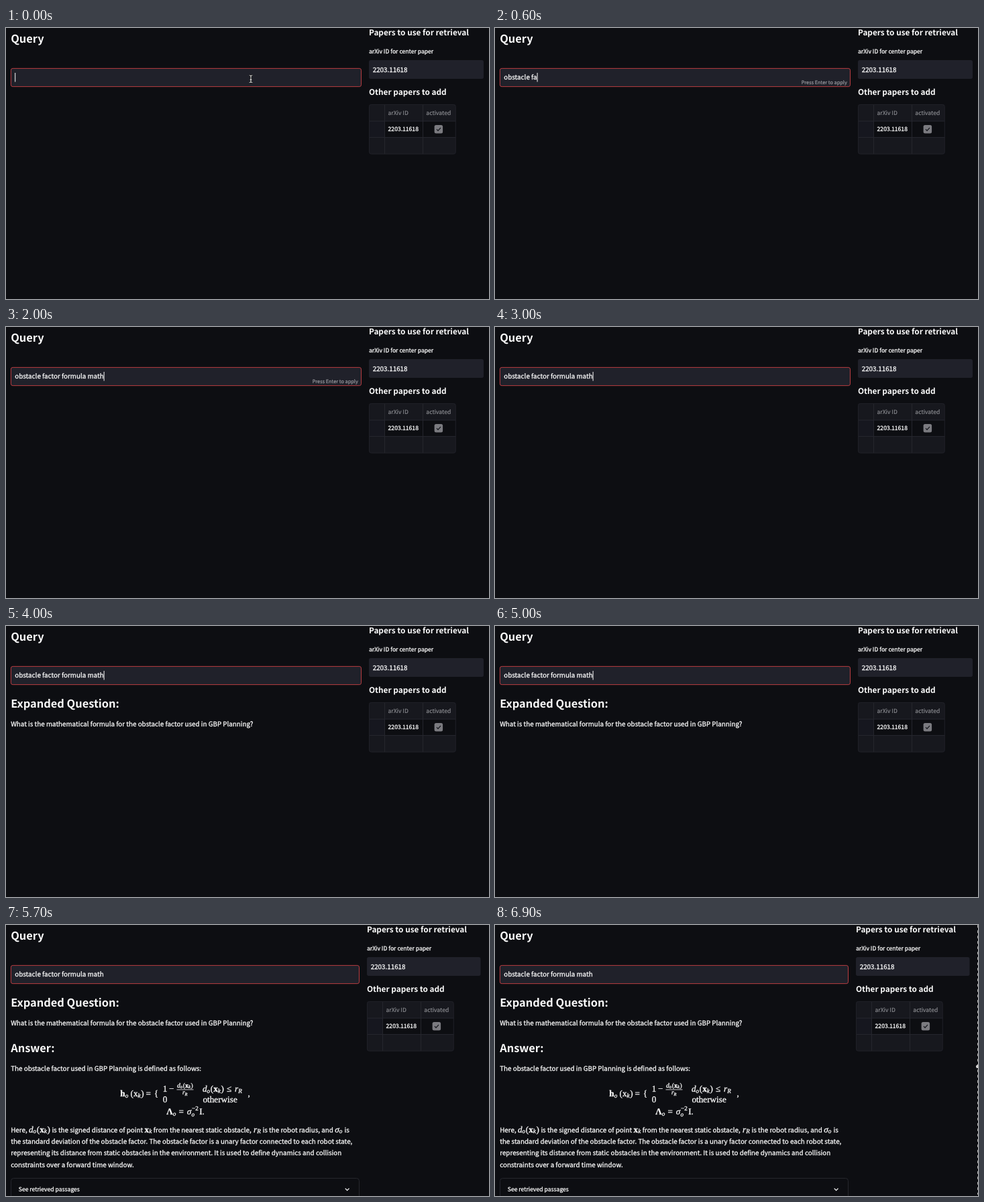
An HTML page that plays this animation: 720 px wide and 405 px high, repeating every 7 s.

```html
<!DOCTYPE html>
<html lang="en">
<head>
<meta charset="utf-8">
<title>Paper query</title>
<style>
  html, body { margin: 0; width: 100%; height: 100%; overflow: hidden; background: #0d0e12; }
  svg { display: block; width: 720px; height: 405px; }
  text {
    font-family: "Noto Sans CJK JP", "Noto Sans CJK SC", "Noto Sans CJK KR", "Noto Sans", sans-serif;
    font-size: 9.83px; fill: #fafafa; stroke: #fafafa; stroke-width: 0.3px;
    text-rendering: geometricPrecision; white-space: pre;
  }
  .title { font-size: 16.4px; font-weight: 700; stroke: none; }
  .subtitle { font-size: 11.8px; font-weight: 700; stroke: none; }
  .small { font-size: 8.6px; }
  .hint { font-size: 7.37px; fill: #a0a1a6; stroke: #a0a1a6; stroke-width: 0.15px; }
  .grey { font-size: 8.6px; fill: #8e8f94; stroke: #8e8f94; stroke-width: 0.15px; }
  .math { font-family: "Liberation Serif", serif; }
</style>
</head>
<body>
<svg id="stage" viewBox="0 0 720 405"></svg>
<script>
const LOOP = 7000, STEP = 100;
const QUERY = "obstacle factor formula math";
const KEY_TIME = 54, ENTER = 2300, QUESTION = 3600, ANSWER = 5700, SELECTION = 6800;

const stage = document.getElementById("stage");

function add(parent, tag, attrs = {}, content = "") {
  const node = document.createElementNS("http://www.w3.org/2000/svg", tag);
  for (const key in attrs) node.setAttribute(key, attrs[key]);
  node.textContent = content;
  return parent.appendChild(node);
}
const group = (parent = stage) => add(parent, "g");
const label = (parent, x, y, content, style = "") =>
  add(parent, "text", { x, y, class: style }, content);
const box = (parent, x, y, width, height, fill, rx = 0, stroke = "none") =>
  add(parent, "rect", { x, y, width, height, fill, rx, stroke });
const line = (parent, d, stroke, width = 1) =>
  add(parent, "path", { d, stroke, "stroke-width": width, fill: "none" });

// Tokens: /italic  *bold  _subscript  plain
function math(parent, x, y, tokens, size = 13.2) {
  const node = add(parent, "text", { x, y, class: "math", style: `font-size:${size}px` });
  let lowered = false;
  for (const token of tokens.split(" ")) {
    const sub = token[0] === "_";
    const attrs = {};
    if (sub || token[0] === "/") attrs["font-style"] = "italic";
    if (token[0] === "*") attrs["font-weight"] = 700;
    if (sub) attrs.style = `font-size:${size * 0.7}px`;
    if (sub !== lowered) {
      attrs.dy = (sub ? 1 : -1) * size * 0.15;
      if (lowered) attrs.dx = size * 0.04;
    }
    lowered = sub;
    add(node, "tspan", attrs, token.replace(/^[/*_]/, ""));
  }
}

label(stage, 7.2, 22, "Query", "title");
const input = box(stage, 7.4, 60.4, 522.1, 27.2, "#20212a", 2.7, "#b83d41");
const typed = label(stage, 13.2, 77.4, "");
const caret = box(stage, 13.6, 67, 1, 13.5, "#fafafa");
const hint = label(stage, 456.7, 83.8, "Press Enter to apply", "hint");

const beam = group();
const beamPath = "M362.7 70.8Q365 70.8 365 72.2Q365 70.8 367.3 70.8M365 72V80M362.7 81.4Q365 81.4 365 80Q365 81.4 367.3 81.4M363.7 77.4H366.3";
line(beam, beamPath, "#000", 2.4);
line(beam, beamPath, "#e8e8e8", 1.1);

const side = group();
label(side, 541, 11.3, "Papers to use for retrieval", "subtitle");
label(side, 541, 37.8, "arXiv ID for center paper", "small");
const idBox = box(side, 541, 48, 171, 28, "#20212a", 2.7);
label(side, 546.7, 65.6, "2203.11618");
label(side, 541, 99.7, "Other papers to add", "subtitle");
box(side, 541, 114, 129.5, 74.5, "#17181e", 3);
box(side, 541, 139, 23, 24, "#16171f");
box(side, 564, 139, 106.5, 24, "#0d0e12");
line(side, "M541 139.2H670.5M541 163.5H670.5M564.5 114V188.5M621.5 114V188.5", "#25262d");
box(side, 541.5, 114.5, 128.7, 73.7, "none", 3, "#202128");
label(side, 569.5, 130.2, "arXiv ID", "grey");
label(side, 626.3, 130.2, "activated", "grey");
label(side, 569.6, 154.2, "2203.11618", "small");
box(side, 638.6, 145, 12.5, 12.5, "#7b7b80", 2.5);
line(side, "M641.9 151.4L644 153.5L648 149.1", "#1a1b20", 1.3);

const question = group();
label(question, 7.2, 122, "Expanded Question:", "title");
label(question, 7.2, 150.3, "What is the mathematical formula for the obstacle factor used in GBP Planning?");

const answer = group();
label(answer, 7.2, 190, "Answer:", "title");
label(answer, 7.2, 218.3, "The obstacle factor used in GBP Planning is defined as follows:");

math(answer, 170.3, 255.6, "*h _o");
math(answer, 185.6, 255.6, "( x _k )");
math(answer, 208.6, 255.6, "=");
math(answer, 220.8, 255.6, "{");
math(answer, 233.8, 248.9, "1");
math(answer, 243, 248.9, "−");
math(answer, 254.9, 243, "/d _o ( *x _k )", 9.9);
line(answer, "M254.5 246H279.5", "#fafafa", 0.8);
math(answer, 263, 253.2, "/r _R", 9.2);
math(answer, 293, 248.9, "/d _o ( *x _k )");
math(answer, 329, 248.9, "≤");
math(answer, 341, 248.9, "/r _R");
math(answer, 233.8, 265.4, "0");
math(answer, 293.5, 265.4, "otherwise");
math(answer, 360.6, 255.6, ",");
math(answer, 239.2, 282.7, "*Λ _o");
math(answer, 257.6, 282.7, "=");
math(answer, 269.7, 282.7, "/σ");
math(answer, 277, 277.2, "−2", 9.2);
math(answer, 276.6, 286.2, "/o", 9.2);
math(answer, 288.2, 282.7, "I.");

label(answer, 7.2, 309.5, "Here,");
math(answer, 34, 309.5, "/d _o ( *x _k )");
label(answer, 68.4, 309.5, "is the signed distance of point");
math(answer, 206.6, 309.5, "*x _k");
label(answer, 219.8, 309.5, "from the nearest static obstacle,");
math(answer, 369, 309.5, "/r _R");
label(answer, 382.6, 309.5, "is the robot radius, and");
math(answer, 490.3, 309.5, "/σ _o");
label(answer, 504.6, 309.5, "is");
[
  "the standard deviation of the obstacle factor. The obstacle factor is a unary factor connected to each robot state,",
  "representing its distance from static obstacles in the environment. It is used to define dynamics and collision",
  "constraints over a forward time window.",
].forEach((content, i) => label(answer, 7.2, 327 + i * 17.46, content));

box(answer, 7.5, 378.5, 519, 40, "none", 4, "#25262d");
label(answer, 18.8, 398.3, "See retrieved passages", "small");
line(answer, "M505.7 393.6L508.6 396.6L511.5 393.6", "#fafafa", 1.3);

// Edge of the screen selection with its handle.
const selection = group();
line(selection, "M719.5 0V403", "#b0b0b0").setAttribute("stroke-dasharray", "4 4");
add(selection, "circle", { cx: 719.5, cy: 211.5, r: 2.5, fill: "#d8d8d8" });

const show = (node, on) => node.setAttribute("visibility", on ? "visible" : "hidden");

function draw(t) {
  const count = Math.min(QUERY.length, Math.floor(t / KEY_TIME));
  const typing = t > 0 && count < QUERY.length;
  const answered = t >= ANSWER;
  typed.textContent = QUERY.slice(0, count);
  caret.setAttribute("x", 13.2 + typed.getComputedTextLength());
  show(caret, typing || t % 1000 < 500);
  show(hint, count > 0 && t < ENTER);
  show(beam, t < STEP);
  show(question, t >= QUESTION);
  show(answer, answered);
  show(selection, t >= SELECTION);
  // The page narrows once the answer makes it scroll.
  input.setAttribute("width", answered ? 519.1 : 522.1);
  idBox.setAttribute("width", answered ? 169.5 : 171);
  side.setAttribute("transform", `translate(${answered ? -3 : 0} 0)`);
}

const start = performance.now();
function tick() {
  const elapsed = (performance.now() - start) % LOOP;
  draw(Math.floor(elapsed / STEP) * STEP);
  requestAnimationFrame(tick);
}
tick();
</script>
</body>
</html>
```
